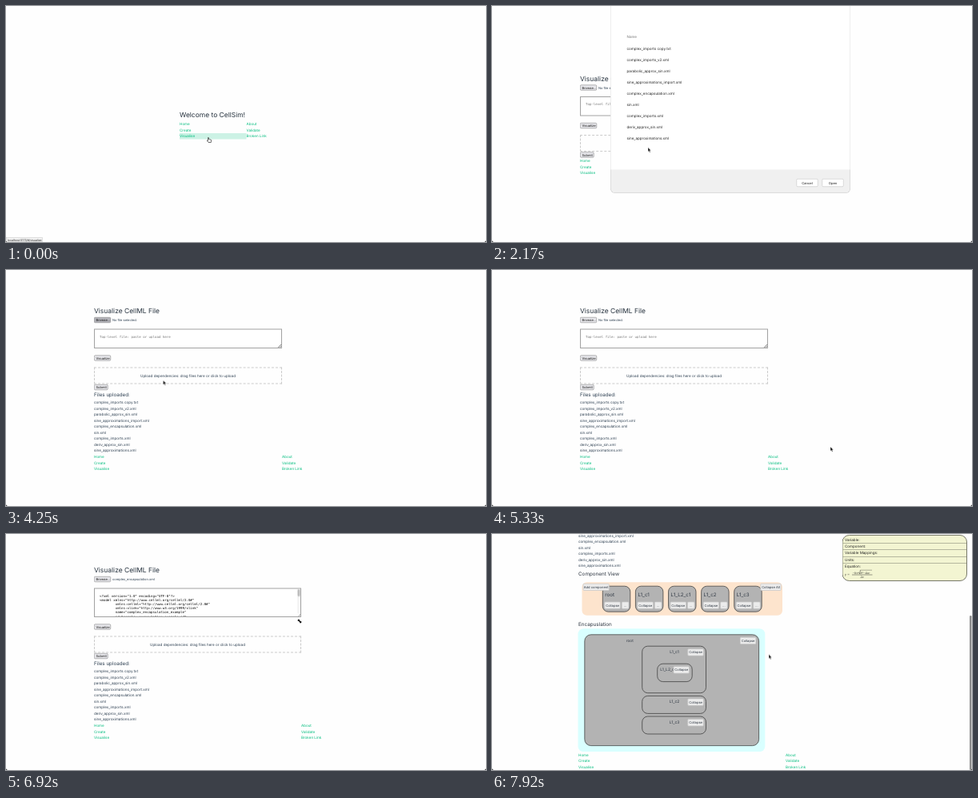
Write an HTML page that moves like this. It is 600 px wide and 295 px high and loops after 8 s.

```html
<!DOCTYPE html>
<html lang="en">
<head>
<meta charset="utf-8">
<title>CellML file viewer</title>
<style>
html, body { margin: 0; width: 100%; height: 100%; overflow: hidden; background: #000; }
* { box-sizing: border-box; }

/* Laid out at double size, then halved, for finer placement */
.stage {
  position: absolute; left: 0; top: 0; width: 1200px; height: 590px; overflow: hidden;
  transform: scale(.5); transform-origin: 0 0;
  background: #fefefe; border-radius: 0 0 5px 5px;
  font: 9.1px/15.1px Inter, "Open Sans", sans-serif; color: #2c3e50;
  text-rendering: geometricPrecision; white-space: nowrap;
}
.stage * { animation-duration: 8s; animation-timing-function: step-end; animation-iteration-count: infinite; }

.title { height: 32px; line-height: 34px; font-size: 16.9px; color: #26323e; }
.links { display: grid; grid-template-columns: 100% 60px; height: 45px; line-height: 15px; color: #00bd7e; }
.links span { height: 15px; }
.home { position: absolute; left: 434px; top: 256px; width: 167px; animation-name: home; }
.home .seen { background: #ccf2e5; }
.view { position: absolute; inset: 0; display: flex; align-items: safe center; animation-name: view; }
.page { position: relative; flex: none; margin-left: 220px; width: 470px;
  animation-name: wide, shift, scroll; animation-timing-function: linear, step-end, ease-in-out; }
.page .seen { animation-name: seen; }

.btn { display: inline-block; height: 14px; padding: 0 4px; border: 1px solid #777; border-radius: 3px;
  background: #e6e6ea; color: #111; font-size: 8.1px; line-height: 12px; text-align: center; }
.pick { display: flex; height: 14px; font-size: 8.1px; line-height: 14px; position: relative; }
.pick .btn { width: 42px; margin-right: 4px; animation-name: press; }
.pick i { font-style: normal; animation-name: early; }
.pick i + i { position: absolute; left: 46px; animation-name: late; }

.area { position: relative; height: 49px; margin-top: 15px; overflow: hidden; border: 2px solid #a2a2a2; background: #fff;
  font: 8.2px/10.4px "DejaVu Sans Mono", "Noto Sans Mono", monospace;
  animation-name: tall; animation-timing-function: linear; }
.area p, .area pre { position: absolute; left: 12px; top: 12px; margin: 0; font: inherit; }
.area p { color: #757575; animation-name: early; }
.area pre { color: #000; animation-name: late; }
.bar { position: absolute; right: 0; top: 0; width: 8px; height: 100%; background: #f5f5f5; animation-name: late; }
.bar b { position: absolute; left: 1px; top: 1px; width: 6px; height: 27%; border-radius: 3px; background: #bdbdbd; }
.grip { position: absolute; right: 0; bottom: 0; width: 8px; height: 8px;
  background: linear-gradient(135deg, #fff 45%, #888 45% 55%, #fff 55% 68%, #888 68% 78%, #fff 78%); }

.show { display: block; width: 42px; margin-top: 17px; }
.drop { position: relative; height: 42px; margin-top: 16px; border: 2px dashed #cbcbcb; text-align: center; animation-name: drop; }
.drop p { position: absolute; inset: 0; margin: 0; line-height: 39px; animation-name: prompt; }
.queue { position: absolute; inset: 11.5px 0 auto; animation-name: queue; }
.queue div { height: 28.2px; line-height: 28.2px; }
.queue .btn { margin-left: 3px; }
.send { display: block; width: 35px; margin: 1px 0; }
.files { height: 0; overflow: hidden; animation-name: files; }
.files h2 { margin: 0; height: 23px; font: 400 12.5px/24px Inter, sans-serif; }
.results { height: 0; overflow: hidden; margin-left: -2px; animation-name: results; }
.results svg, .info svg { display: block; }

.info { position: absolute; left: 875px; top: 2px; width: 313px; height: 116px; padding: 4px 5px; border: 2px solid #77786a;
  border-radius: 18px; background: #f3f5d2; color: #222; animation-name: shown; }
.info div { height: 16.2px; line-height: 16px; border-bottom: 1px solid #77786a; margin: 0 -5px; padding-left: 5px; }
.info div:last-of-type { border: 0; }
.thumb { position: absolute; right: 1px; width: 5px; border-radius: 3px; background: #8c8c8c; animation-name: thumb; }
.status { position: absolute; left: 0; bottom: 0; width: 91px; height: 12px; padding-left: 3px; border: 1px solid #ccc;
  background: #f2f2f2; color: #222; font-size: 7px; line-height: 11px; animation-name: status; }

.sheet { position: absolute; left: 296px; top: 0; width: 600px; height: 468px; border: 1px solid #c4c4c4; border-top: 0;
  border-radius: 0 0 12px 12px; background: #f0f0f0; color: #222; animation-name: sheet; }
.list { position: absolute; inset: 60px 0 58px; padding: 94px 20px 0; background: #fff; padding-top: 0; }
.list div { height: 28px; padding-left: 20px; line-height: 28px; border-radius: 6px; animation-name: all; }
.list div.one { animation-name: one; }
.list h3 { margin: 0; height: 94px; padding: 64px 20px 0; font: 400 9px/28px Inter, sans-serif; color: #777; }
.list { top: 0; }
.sheet .btn { position: absolute; right: 16px; bottom: 15px; width: 54px; height: 20px; line-height: 18px; border-color: #bbb; background: #fff; }
.sheet .btn + .btn { right: 80px; }

.cursor { position: absolute; left: 0; top: 0; width: 0; height: 0; animation-name: move; animation-timing-function: ease-in-out; }
.cursor svg { position: absolute; left: 0; top: 0; overflow: visible; }
.arrow { animation-name: arrow; } .hand { animation-name: hand; } .size { animation-name: size; }

@keyframes home { 0% { opacity: 1 } 3%, 100% { opacity: 0 } }
@keyframes view { 0% { opacity: 0 } 3%, 100% { opacity: 1 } }
@keyframes status { 0%, 40% { opacity: 1 } 3%, 45.5%, 100% { opacity: 0 } }
@keyframes seen { 0%, 45.5%, 100% { background: none } 40% { background: #ccf2e5 } }
@keyframes press { 0%, 54.3%, 100% { background: #e6e6ea } 51% { background: #b4b4ba } }
@keyframes early { 0% { opacity: 1 } 68.5%, 100% { opacity: 0 } }
@keyframes late { 0% { opacity: 0 } 68.5%, 100% { opacity: 1 } }
@keyframes drop { 0%, 40%, 100% { height: 42px } 34.4% { height: 281px } }
@keyframes prompt { 0%, 40%, 100% { opacity: 1 } 34.4% { opacity: 0 } }
@keyframes queue { 0%, 40%, 100% { opacity: 0 } 34.4% { opacity: 1 } }
@keyframes files { 0% { height: 0 } 40%, 100% { height: 159px } }
@keyframes results { 0% { height: 0 } 92%, 100% { height: 457px } }
@keyframes shown { 0% { opacity: 0 } 92%, 100% { opacity: 1 } }
@keyframes wide { 0%, 76.5% { width: 470px } 78.1%, 79.1% { width: 500px } 80.8%, 83% { width: 620px } 86.4%, 100% { width: 518px } }
@keyframes tall { 0%, 76.5% { height: 49px } 78.1%, 79.1% { height: 99px } 80.8%, 83% { height: 249px } 86.4%, 100% { height: 73px } }
@keyframes shift { 0%, 83.5% { margin-left: 220px } 80.5%, 92%, 100% { margin-left: 216px } }
@keyframes scroll { 0%, 93.5% { transform: none } 98.9%, 100% { transform: translateY(-310px) } }
@keyframes thumb {
  0%, 83.5% { opacity: 0; top: 0; height: 562px }
  80.5% { opacity: 1; top: 0; height: 562px }
  92% { opacity: 1; top: 0; height: 386px }
  93.5% { opacity: 1; top: 0; height: 386px; animation-timing-function: ease-in-out }
  98.9%, 100% { opacity: 1; top: 204px; height: 386px }
}
@keyframes sheet { 0%, 33%, 66.5%, 100% { opacity: 0 } 20%, 54.1% { opacity: 1 } }
@keyframes all { 0%, 33%, 100% { background: none; color: #222 } 28% { background: #0a64d8; color: #fff } }
@keyframes one { 0%, 33%, 66.5%, 100% { background: none; color: #222 } 28%, 57% { background: #0a64d8; color: #fff } }
@keyframes hand { 0%, 11.5%, 19%, 35.5%, 40% { opacity: 1 } 10%, 14%, 20%, 38.5%, 45.5%, 100% { opacity: 0 } 3% { opacity: 0 } }
@keyframes arrow { 0%, 11.5%, 19%, 35.5%, 40%, 74.5% { opacity: 0 } 3%, 14%, 20%, 38.5%, 45.5%, 88%, 100% { opacity: 1 } }
@keyframes size { 0%, 88%, 100% { opacity: 0 } 74.5% { opacity: 1 } }
@keyframes move {
  0%, 2.5% { transform: translate(506px, 329px) }
  10.4%, 13.5% { transform: translate(237px, 331px) }
  16.6%, 17.6% { transform: translate(247px, 314px) }
  19.3%, 21% { transform: translate(360px, 340px) }
  24%, 25% { transform: translate(390px, 168px) }
  28% { transform: translate(390px, 392px) }
  32%, 34.4% { transform: translate(846px, 442px) }
  36.5%, 37.5% { transform: translate(397px, 475px) }
  39%, 45% { transform: translate(236px, 490px) }
  50%, 51.3% { transform: translate(242px, 123px) }
  53.1%, 56% { transform: translate(393px, 276px) }
  57%, 62.5% { transform: translate(396px, 278px) }
  65.3%, 67% { transform: translate(846px, 442px) }
  74.5%, 76.4% { transform: translate(687px, 195px) }
  78.1%, 79.1% { transform: translate(776px, 322px) }
  80.8%, 83% { transform: translate(836px, 312px) }
  86.4%, 87.4% { transform: translate(734px, 218px) }
  90.5%, 93% { transform: translate(240px, 232px) }
  98.9%, 100% { transform: translate(692px, 301px) }
}
</style>
</head>
<body>
<div class="stage">
  <div class="home">
    <div class="title">Welcome to CellSim!</div>
    <div class="links"></div>
  </div>

  <div class="view">
    <div class="page">
      <div class="title">Visualize CellML File</div>
      <div class="pick"><span class="btn">Browse...</span><i>No file selected.</i><i>complex_encapsulation.xml</i></div>
      <div class="area">
        <p>Top-level file: paste or upload here</p>
        <pre></pre>
        <div class="bar"><b></b></div>
        <div class="grip"></div>
      </div>
      <span class="btn show">Visualize</span>
      <div class="drop">
        <p>Upload dependencies: drag files here or click to upload</p>
        <div class="queue"></div>
      </div>
      <span class="btn send">Submit</span>
      <div class="files"><h2>Files uploaded:</h2></div>
      <div class="results"><svg width="520" height="457" viewBox="107 43.8 260 228.5"></svg></div>
      <div class="links"></div>
    </div>
  </div>

  <div class="info">
    <div>Variable:</div><div>Component:</div><div>Variable Mappings:</div><div>Units:</div><div>Equation:</div>
    <svg width="80" height="26" viewBox="0 0 80 26" font-family="Liberation Serif, serif" font-size="9" font-style="italic" fill="#222">
      <text x="0" y="15">y =</text>
      <text x="19" y="10" font-size="8">−b±</text>
      <path d="M33 8l2-1 2 4 2-10h29M18 13h51" fill="none" stroke="#222" stroke-width=".9"/>
      <text x="39" y="10" font-size="8">b²−4ac</text>
      <text x="39" y="21" font-size="8">2a</text>
    </svg>
  </div>
  <div class="thumb"></div>
  <div class="status">localhost:5173/#/visualize</div>

  <div class="sheet">
    <div class="list"><h3>Name</h3></div>
    <span class="btn">Open</span><span class="btn">Cancel</span>
  </div>

  <div class="cursor">
    <svg class="arrow" width="8" height="13"><path d="M0 0V10.5L2.4 8.4 4.2 12.4 6 11.6 4.3 7.7H7.5Z" fill="#111" stroke="#fff" stroke-width=".7"/></svg>
    <svg class="hand" width="10" height="13"><path d="M-1 0q1.2-.8 2 .4V4l5 1.2q1.4.4 1.2 2L6.5 12H0L-3.6 7.6q.6-1.5 2.6.2Z" fill="#fff" stroke="#111" stroke-width="1.2"/></svg>
    <svg class="size" width="8" height="8"><path d="M-4-4H0L-1.2-2.8 2.8 1.2 4 0V4H0L1.2 2.8-2.8-1.2-4 0Z" fill="#111" stroke="#111"/></svg>
  </div>
</div>

<script>
const $ = s => document.querySelector(s);
const add = (s, html) => $(s).insertAdjacentHTML('beforeend', html);

const files = ['complex_imports copy.txt', 'complex_imports_v2.xml', 'parabolic_approx_sin.xml',
  'sine_approximations_import.xml', 'complex_encapsulation.xml', 'sin.xml',
  'complex_imports.xml', 'deriv_approx_sin.xml', 'sine_approximations.xml'];
for (const f of files) {
  add('.queue', `<div>${f}<span class="btn">Remove</span></div>`);
  add('.files', `<div>${f}</div>`);
  add('.list', `<div class="${f === 'complex_encapsulation.xml' ? 'one' : ''}">${f}</div>`);
}

const links = ['Home', 'About', 'Create', 'Validate', 'Visualise', 'Broken Link'];
document.querySelectorAll('.links').forEach(el => {
  el.innerHTML = links.map(t => `<span class="${t === 'Visualise' ? 'seen' : ''}">${t}</span>`).join('');
});

const parts = ['root', 'L1_c1', 'L1_L2_c1', 'L1_c2', 'L1_c3'];
$('.area pre').textContent = `<?xml version="1.0" encoding="UTF-8"?>
<model xmlns="http://www.cellml.org/cellml/2.0#"
        xmlns:cellml="http://www.cellml.org/cellml/2.0#"
        xmlns:xlink="http://www.w3.org/1999/xlink"
        name="complex_encapsulation_example"
        id="complex_encpsulation_example_id">
${parts.map(p => `  <component name="${p}"/>`).join('\n')}
  <encapsulation>
    <component_ref component="root">
      <component_ref component="L1_c1">
        <component_ref component="L1_L2_c1"/>
      </component_ref>
      <component_ref component="L1_c2"/>
      <component_ref component="L1_c3"/>
    </component_ref>
  </encapsulation>
</model>`;

// Result drawings
const box = (x, y, w, h, r, fill, line = 'none') =>
  `<rect x="${x}" y="${y}" width="${w}" height="${h}" rx="${r}" fill="${fill}" stroke="${line}" stroke-width=".7"/>`;
const text = (x, y, s, size, anchor = 'start') =>
  `<text x="${x}" y="${y}" font-size="${size}" text-anchor="${anchor}" fill="#2c3540">${s}</text>`;
const button = (x, y, w, s) =>
  box(x, y, w, 8.3, 1, '#ececec', '#c9c9c9') + text(x + w / 2, y + 5.6, s, 4.1, 'middle');
const node = (x, y, w, h, r) => box(x, y, w, h, r, '#b3b3b3', '#333');

let art = text(108, 51.8, 'Component View', 6.3) + box(112.5, 60, 250.5, 41.5, 6, '#fde4cd');
parts.forEach((p, i) => {
  const x = 138.3 + i * 41.1;
  art += node(x, 65, 34.5, 32, 7) + text(x + 3, 77.8, p, 6.2)
    + button(x + 2.5, 84.8, 19.5, 'Collapse') + button(x + 24, 84.8, 8.5, '...');
});
art += button(114, 62, 32.3, 'Add component') + button(335.8, 62, 25.4, 'Collapse All')
  + text(108, 114.4, 'Encapuslation', 6.3)
  + box(107.5, 118, 233.8, 154, 7, '#d9ffff')
  + node(115.8, 125.6, 217.8, 138.8, 8) + text(172.3, 134.5, 'root', 4.7, 'middle') + button(310.3, 129, 19.5, 'Collapse');
const cells = [['L1_c1', 140, 58.5], ['L1_c2', 202.2, 22], ['L1_c3', 227.8, 22]];
for (const [name, y, h] of cells)
  art += node(187.7, y, 79.8, h, 7) + text(228, y + 9, name, 4.9, 'middle') + button(244.8, y + 3.6, 19.5, 'Collapse');
art += node(206.7, 162, 43.5, 22.4, 7) + text(210.2, 171.2, 'L1_L2_c1', 4.9) + button(227, 165.6, 19.3, 'Collapse');
$('.results svg').innerHTML = art;
</script>
</body>
</html>
```
